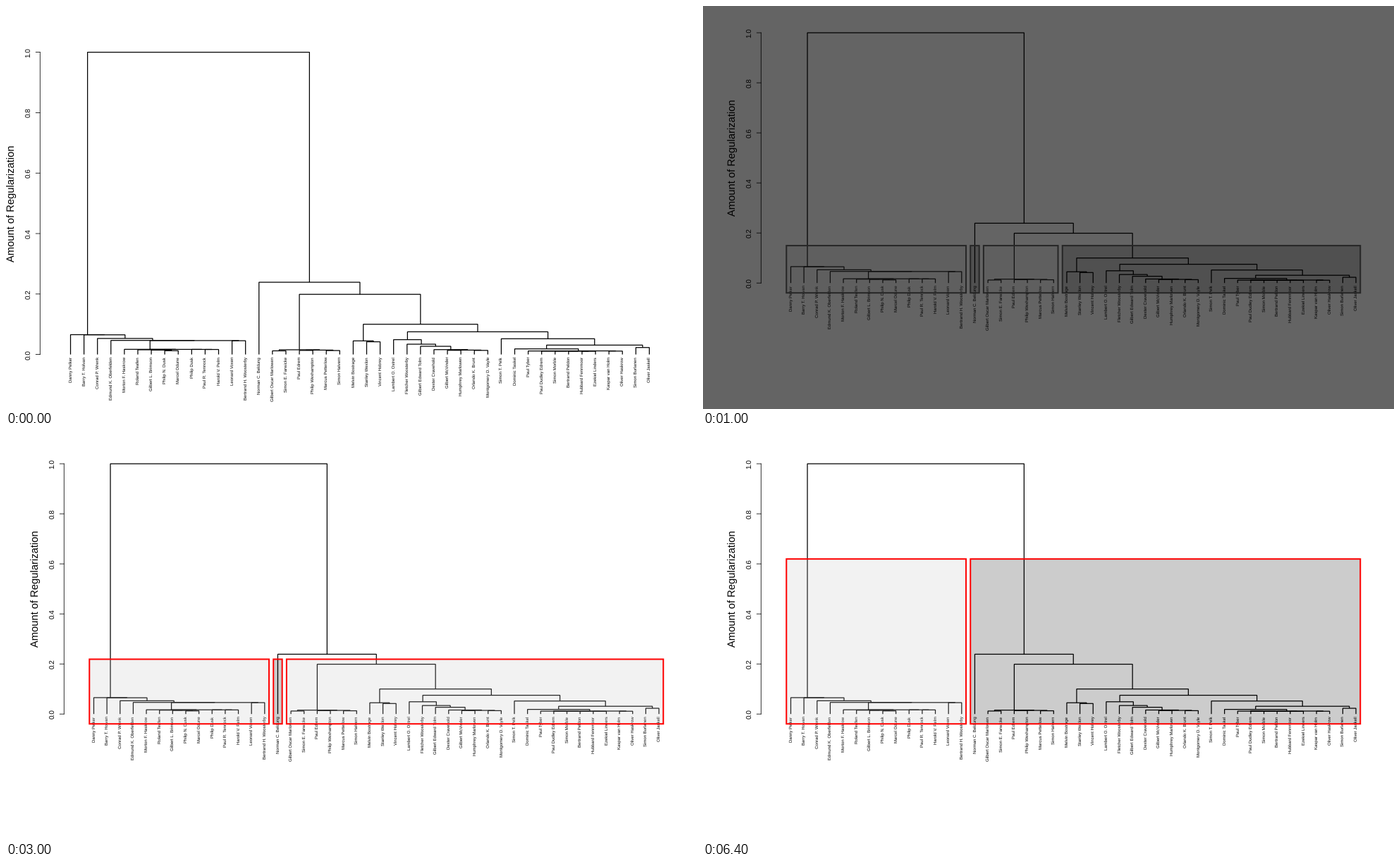
A matplotlib script for the animation above (8 s loop, 980 by 572 pixels).

```python
import matplotlib.pyplot as plt
from matplotlib.animation import FuncAnimation
from matplotlib.collections import LineCollection
from matplotlib.patches import Rectangle

W, H, DPI = 980, 572, 100
PX = 72 / DPI

plt.rcParams["font.family"] = "Liberation Sans"
plt.rcParams["text.hinting"] = "none"
plt.rcParams["path.snap"] = False

NAMES = """Danny Pelker, Barry T. Holvan, Conrad P. Wrenk, Edmund K. Oberfelden,
Morton F. Haskrow, Roland Teafen, Gilbert L. Brimson, Philip N. Dusk, Marcel Odune,
Philip Dusk, Paul R. Tennock, Harold V. Pelm, Leonard Voxen, Bertrand H. Woosterby,
Norman C. Beldung, Gilbert Oscar Marlowen, Simon E. Farwicke, Paul Edrem,
Philip Wexhampton, Marcus Petterlow, Simon Halvern, Melvin Bostrage, Stanley Wexlon,
Vincent Hobrey, Lambert O. Ostrel, Fletcher Woosterby, Gilbert Edward Tolm,
Dexter Cravehold, Gilbert McVinder, Humphrey Marlowen, Orlando K. Brunt,
Montgomery D. Vayle, Simon T. Pelk, Dominic Taskel, Paul Tyber, Paul Dudley Edrem,
Simon Morble, Bertrand Peldon, Hubbard Fennmoor, Ezekiel Linders, Kaspar van Holm,
Oliver Haskrow, Simon Burlanen, Oliver Jaskell"""
NAMES = [n.strip() for n in NAMES.split(",")]


def chain(first, *heights):
    """Leaves joined one by one from the right; heights run from the top down."""
    if not heights:
        return first
    return heights[0], first, chain(first + 1, *heights[1:])


# A node is (height, left, right); a plain integer is a leaf.
LATE = (.017, 4, (.0168, chain(5, .0155, .0145, .0125), chain(9, .0167, .0165)))
MODERN = (.0655, 0, (.065, 1, (.053, 2, (.0465, 3, (.046, LATE, (.0455, 12, 13))))))
EARLY = (.0155, (.012, 15, 16), (.0145, (.0135, 17, 18), (.013, 19, 20)))
PAIRS = (.0145, (.0138, 28, 29), (.0135, 30, 31))
GILDED = (.049, 24, (.034, 25, (.027, 26, (.016, 27, PAIRS))))
PREWAR = (.0118, chain(34, .0115, .0113, .0111, .0109, .0107), (.0112, 40, 41))
MIDDLE = (.052, 32, (.031, (.0185, 33, PREWAR), (.023, 42, 43)))
REST = (.1, chain(21, .045, .042), (.075, GILDED, MIDDLE))
TREE = (1, MODERN, (.239, 14, (.199, EARLY, REST)))


def branches(node, out):
    """Collect the bracket of every merge; return the node's place and height."""
    if isinstance(node, int):
        return node, 0
    h, left, right = node
    (xl, hl), (xr, hr) = branches(left, out), branches(right, out)
    out.append([(xl, hl), (xl, h), (xr, h), (xr, hr)])
    return (xl + xr) / 2, h


BRACKETS = []
branches(TREE, BRACKETS)

# axis x, gap between leaves, y of height 0 and of height 1
WIDE = (48.3, 19.09, 494.6, 65.6)
SMALL = (82.3, 18.64, 393.2, 38)

# last leaf of each group and the height of the cut, halfway between two merges
FOUR = ([13, 14, 20, 43], (.199 + .1) / 2)
THREE = ([13, 14, 43], (.239 + .199) / 2)
TWO = ([13, 43], (1 + .239) / 2)

# background, the two translucent fills, box edge
BRIGHT = ("white", "#bebebe33", "#00000033", "#ff0000")
DIM = ("#646464", "#4b4b4b33", "#00000033", "#262626")

SCENES = [(WIDE, None, BRIGHT), (SMALL, FOUR, DIM), (SMALL, FOUR, BRIGHT),
          (SMALL, THREE, BRIGHT), (SMALL, TWO, BRIGHT)]

fig = plt.figure(figsize=(W / DPI, H / DPI), dpi=DPI)
ax = fig.add_axes([0, 0, 1, 1])


def place(layout, leaf, height):
    axis, gap, y0, y1 = layout
    return axis + gap * (leaf + 2.264), y0 + (y1 - y0) * height


def upright(x, y, s, size, ha="center"):
    ax.text(x, y, s, fontsize=size * PX, rotation=90, rotation_mode="anchor",
            ha=ha, va="baseline", zorder=2)


def draw_axis(layout):
    x = layout[0]
    ys = [place(layout, 0, k / 5)[1] for k in range(6)]
    segs = [[(x, ys[0]), (x, ys[-1])]] + [[(x - 6, y), (x, y)] for y in ys]
    ax.add_collection(LineCollection(segs, colors="black", linewidths=.8 * PX,
                                     capstyle="projecting"))
    for k, y in enumerate(ys):
        upright(x - 13, y, f"{k / 5:.1f}", 10)
    upright(x - 36.5, (ys[0] + ys[-1]) / 2, "Amount of Regularization", 14.7)


def draw_tree(layout):
    segs = [[place(layout, *p) for p in b] for b in BRACKETS]
    ax.add_collection(LineCollection(segs, colors="black", linewidths=1.25 * PX,
                                     joinstyle="miter", zorder=1))
    for i, name in enumerate(NAMES):
        x, y = place(layout, i, 0)
        upright(x + 2, y + 3.3, name, 6, "right")


def draw_boxes(layout, groups, colors):
    ends, cut = groups
    start = 0
    for k, end in enumerate(ends):
        x, top = place(layout, start - 1 / 3, cut)
        right, base = place(layout, end + 1 / 3, 0)
        box = (x, top), right - x, base + 14 - top
        ax.add_patch(Rectangle(*box, fc=colors[1 + k % 2], ec="none", zorder=3))
        ax.add_patch(Rectangle(*box, fc="none", ec=colors[3], lw=2 * PX, zorder=4))
        start = end + 1


def draw(i):
    layout, groups, colors = SCENES[min(i, len(SCENES) - 1)]
    ax.clear()
    ax.set(xlim=(0, W), ylim=(H, 0))
    ax.axis("off")
    fig.set_facecolor(colors[0])
    draw_axis(layout)
    draw_tree(layout)
    if groups:
        draw_boxes(layout, groups, colors)
    return []


anim = FuncAnimation(fig, draw, frames=8, init_func=lambda: draw(0),
                     interval=1000, repeat=True, repeat_delay=0, blit=False)
plt.show()
```
